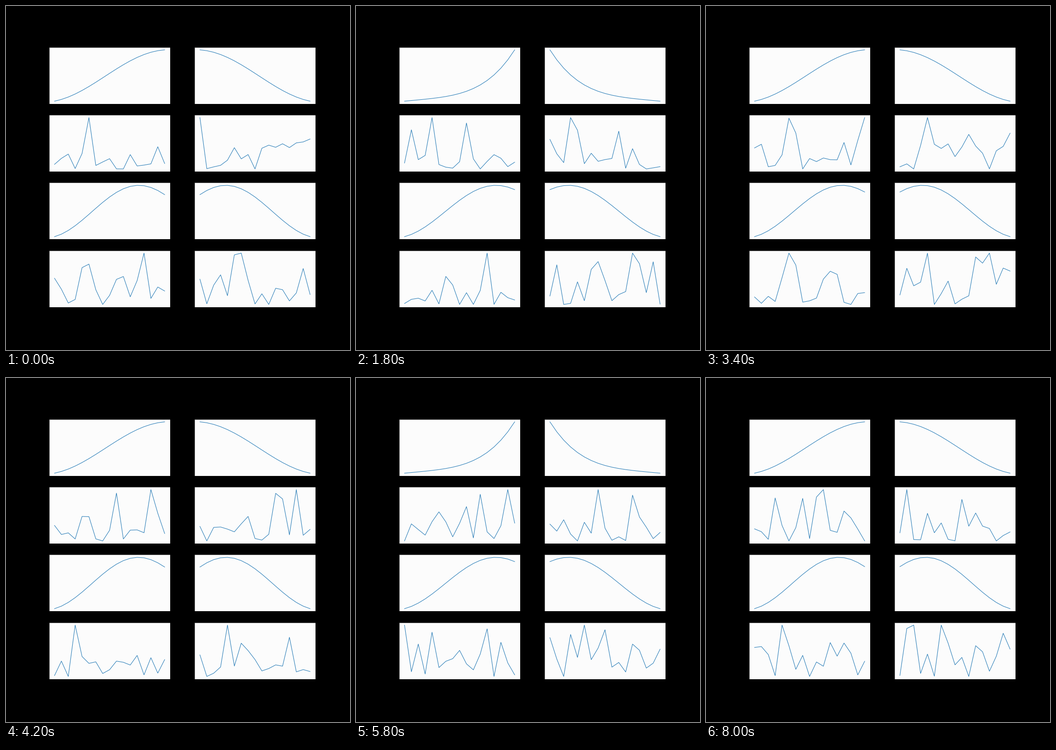
A matplotlib script for the animation above (8200 ms loop, 748 by 748 pixels).

```python
import numpy as np
import matplotlib.pyplot as plt
from matplotlib.animation import FuncAnimation

SIZE, DPI = 748, 50
FRAMES, STEP_MS, PERIOD = 41, 200, 20
X = np.arange(17)


def unit(y):
    """Scale a curve to the range 0..1."""
    return (y - y.min()) / (y.max() - y.min())


def wave(peak):
    """Cosine arch that starts near its trough and tops out at x = peak."""
    return unit(np.cos(2.83 * (X / peak - 1)))


def hump(step):
    """Arch whose peak sways to and fro once per cycle."""
    return wave(12.82 - 0.65 * np.cos(2 * np.pi * (step - 1.5) / PERIOD))


def rise(step):
    """S-curve that bends into a steep upward sweep and back."""
    u = X / X[-1]
    sweep = 0.2 * u + 0.8 * u**4
    bend = np.sin(np.pi * (step + 1) / PERIOD) ** 4
    return (1 - bend) * wave(16.6) + bend * sweep


def noise(frame):
    rng = np.random.default_rng(500 + frame)
    return [unit(rng.exponential(size=X.size)) for _ in range(4)]


fig, axes = plt.subplots(4, 2, figsize=(SIZE / DPI, SIZE / DPI), dpi=DPI,
                         facecolor="black")
fig.subplots_adjust(left=0.125, right=0.9, bottom=0.125, top=0.88,
                    wspace=0.2, hspace=0.2)
lines = []
for ax in axes.flat:
    ax.set(facecolor="#fcfcfc", xticks=[], yticks=[],
           xlim=(-0.8, 16.8), ylim=(-0.05, 1.05))
    lines += ax.plot(X, np.zeros(X.size), color="#1f77b4", lw=1.5)


def draw(frame):
    step = frame % PERIOD
    up, arch = rise(step), hump(step)
    a, b, c, d = noise(frame)
    curves = [up, up[::-1], a, b, arch, arch[::-1], c, d]
    for line, y in zip(lines, curves):
        line.set_ydata(y)
    return lines


anim = FuncAnimation(fig, draw, frames=FRAMES, interval=STEP_MS,
                     repeat=True, repeat_delay=0, blit=False)
plt.show()
```
